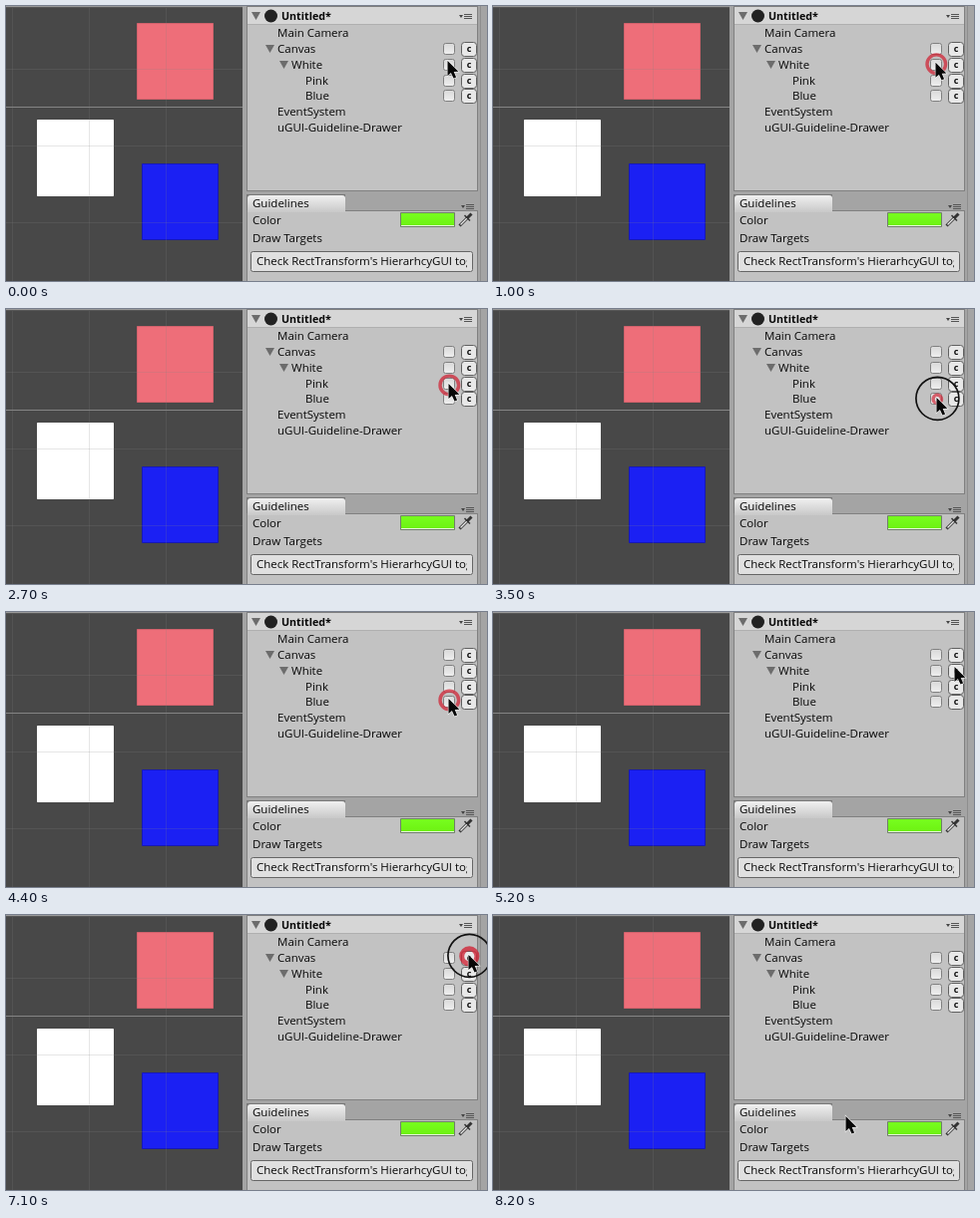
These frames come from a looping animation (482x276 px, 8.3 s). An HTML page with a canvas:

```html
<!DOCTYPE html>
<html lang="en">
<head>
<meta charset="utf-8">
<title>Guideline drawer</title>
<style>
html, body { margin: 0; width: 100%; height: 100%; overflow: hidden; background: #a4a4a4; }
canvas { display: block; width: 482px; height: 276px; }
</style>
</head>
<body>
<canvas id="stage"></canvas>
<script>
const LOOP = 8300, STEP = 100;
const FAMILY = '"Open Sans", "Noto Sans", sans-serif';
const FONT = '11.5px ' + FAMILY;
const BOLD = 'bold 10.7px ' + FAMILY;
const SMALL = 'bold 9px ' + FAMILY;

const canvas = document.getElementById('stage');
const ratio = window.devicePixelRatio || 1;
canvas.width = 482 * ratio;
canvas.height = 276 * ratio;
const c = canvas.getContext('2d');
c.scale(ratio, ratio);

const shapes = {
  White: { x: 31, y: 114, fill: '#fff', edge: '#fff' },
  Pink: { x: 131, y: 17, fill: '#ee6e79', edge: '#d2626c' },
  Blue: { x: 136, y: 158, fill: '#1b20f3', edge: '#1719b4' }
};
const SIDE = 77;

// label, indent, foldout, has buttons
const rows = [
  ['Main Camera', 272, false, false],
  ['Canvas', 272, true, true],
  ['White', 286, true, true],
  ['Pink', 300, false, true],
  ['Blue', 300, false, true],
  ['EventSystem', 272, false, false],
  ['uGUI-Guideline-Drawer', 272, false, false]
];

// start, end, shown targets
const selections = [
  [500, 1000, ['White']],
  [2000, 2700, ['Pink']],
  [3700, 4400, ['Blue']],
  [5500, 6400, ['Pink', 'Blue']],
  [7200, 7900, ['White', 'Pink', 'Blue']]
];
const presses = [300, 800, 1800, 2500, 3500, 4200, 5300, 6200, 7000, 7700];

// time, x, y of the pointer tip
const path = [
  [0, 443, 55], [100, 444, 56], [1200, 444, 57], [1600, 444, 75],
  [2900, 444, 75], [3300, 445, 89], [3600, 445, 89], [4200, 444, 87],
  [4500, 444, 87], [5100, 463, 55], [5700, 463, 55], [6000, 463, 52],
  [6600, 463, 53], [6900, 464, 40], [7900, 464, 40], [8200, 354, 202]
];

function rect(x, y, w, h, fill) {
  c.fillStyle = fill;
  c.fillRect(x, y, w, h);
}

function box(x, y, w, h, r, fill, stroke) {
  c.beginPath();
  c.roundRect(x + 0.5, y + 0.5, w - 1, h - 1, r);
  c.fillStyle = fill;
  c.fill();
  c.strokeStyle = stroke;
  c.lineWidth = 1;
  c.stroke();
}

function fade(y0, y1, from, to) {
  const g = c.createLinearGradient(0, y0, 0, y1);
  g.addColorStop(0, from);
  g.addColorStop(1, to);
  return g;
}

function poly(points, fill) {
  c.beginPath();
  points.forEach(([x, y]) => c.lineTo(x, y));
  c.closePath();
  c.fillStyle = fill;
  c.fill();
}

function line(points, color, width) {
  c.beginPath();
  points.forEach(([x, y]) => c.lineTo(x, y));
  c.strokeStyle = color;
  c.lineWidth = width;
  c.stroke();
}

function ring(x, y, r, width, color) {
  c.beginPath();
  c.arc(x, y, r, 0, 7);
  c.lineWidth = width;
  c.strokeStyle = color;
  c.stroke();
}

function text(s, x, y, font = FONT) {
  c.font = font;
  c.fillStyle = '#080808';
  c.fillText(s, x, y);
}

function foldout(x, y) {
  poly([[x, y], [x + 9, y], [x + 4.5, y + 8]], '#6c6c6c');
}

function menuIcon(x, y) {
  poly([[x, y + 1], [x + 4, y + 1], [x + 2, y + 4]], '#444');
  for (let i = 0; i < 3; i++) rect(x + 5, y + i * 2, 8, 1, '#555');
}

function drawScene(targets) {
  rect(0, 0, 237, 276, '#484848');
  rect(0, 0, 237, 1, '#999');
  rect(0, 1, 237, 1, '#555');
  rect(0, 101, 237, 1, '#858585');
  for (const { x, y, fill, edge } of Object.values(shapes))
    box(x, y, SIDE, SIDE, 0, fill, edge);
  for (let i = 0; i < 3; i++) {
    rect(6 + i * SIDE, 2, 1, 274, 'rgba(128,128,128,.2)');
    rect(0, 63 + i * SIDE, 237, 1, 'rgba(128,128,128,.2)');
  }
  for (const name of targets) {
    const { x, y } = shapes[name];
    for (const d of [0, SIDE]) {
      rect(x + d, 2, 1, 274, 'rgba(110,235,75,.75)');
      rect(0, y + d, 237, 1, 'rgba(110,235,75,.75)');
    }
  }
}

function drawHierarchy(targets) {
  rect(237, 0, 245, 276, '#a4a4a4');
  rect(241, 0, 232, 186, '#808080');
  rect(242, 1, 230, 184, '#c2c2c2');
  rect(242, 1, 230, 17, '#d6d6d6');
  rect(242, 18, 230, 1, '#b0b0b0');
  rect(475, 0, 1, 276, '#8e8e8e');
  foldout(246, 6);
  c.beginPath();
  c.arc(265.5, 10, 6.5, 0, 7);
  c.fillStyle = '#222';
  c.fill();
  text('Untitled*', 276, 14, BOLD);
  menuIcon(454, 8);

  rows.forEach(([label, x, open, buttons], i) => {
    const mid = 26.8 + i * 15.9;
    text(label, x, mid + 4);
    if (open) foldout(x - 12, Math.round(mid) - 4);
    if (!buttons) return;
    const top = Math.round(mid) - 6;
    box(438, top, 12, 12, 2, fade(top, top + 12, '#d8d8d8', '#f0f0f0'), '#808080');
    if (targets.includes(label))
      line([[440.5, top + 5.5], [443.5, top + 9], [449, top + 1]], '#1c2c62', 2.2);
    box(456, top - 1, 16, 15, 3, '#e8e8e8', '#606060');
    text('c', 461.7, top + 9, SMALL);
  });
}

function drawGuidelines(targets) {
  rect(241, 189, 99, 17, '#777');
  rect(241, 205, 232, 71, '#808080');
  rect(242, 206, 230, 70, '#c2c2c2');
  c.beginPath();
  c.roundRect(242, 190, 98, 17, [3, 3, 0, 0]);
  c.fillStyle = fade(190, 207, '#f0f0f0', '#c8c8c8');
  c.fill();
  text('Guidelines', 247, 202);
  menuIcon(456, 199);

  text('Color', 247, 219);
  box(395, 207, 55, 15, 0, fade(207, 222, '#78ff20', '#6cf010'), '#6f7f68');
  rect(396, 220, 53, 1, '#e4f5da');
  line([[454.5, 220.5], [462, 213]], '#333', 3);
  line([[455.5, 219.5], [462, 213]], '#eee', 1.2);
  line([[459.5, 210], [465, 215.5]], '#333', 1.5);
  line([[462, 213], [466.5, 208.5]], '#333', 3);

  text('Draw Targets', 247, 237);
  const count = Math.max(1, targets.length);
  box(245, 246, 223, 4 + count * 17, 2, '#e0e0e0', '#666');
  c.save();
  c.beginPath();
  c.rect(246, 246, 216, 30);
  c.clip();
  const lines = targets.length ? targets : ["Check RectTransform's HierarhcyGUI toggle"];
  lines.forEach((s, i) => text(s, 251, 260 + i * 17));
  c.restore();
}

function pointerAt(t) {
  let i = 0;
  while (i < path.length - 2 && path[i + 1][0] <= t) i++;
  const [t0, x0, y0] = path[i], [t1, x1, y1] = path[i + 1];
  const k = Math.min(1, (t - t0) / (t1 - t0));
  return [x0 + (x1 - x0) * k, y0 + (y1 - y0) * k];
}

function drawPointer(t) {
  const [x, y] = pointerAt(t);
  const press = presses.find(p => t >= p && t < p + 400);
  if (press !== undefined) {
    const age = (t - press) / 100;
    const radius = [4.2, 7.6, 9.3, 11][age];
    const width = [3.4, 5, 3.4, 2][age];
    const alpha = [0.7, 0.8, 0.75, 0.4][age];
    ring(x + 0.3, y + 1.4, radius, width, `rgba(207,38,55,${alpha})`);
    if (age < 2) ring(x + 0.4, y + 0.8, 21.5, 1.7, '#111');
  }
  c.save();
  c.translate(x - 0.5, y);
  c.beginPath();
  [[0, 0], [0, 15], [3.4, 12], [6, 17.5], [8.6, 16.4], [6.2, 11], [10.8, 10.8]]
    .forEach(([px, py]) => c.lineTo(px, py));
  c.closePath();
  c.lineWidth = 1.4;
  c.strokeStyle = 'rgba(255,255,255,.7)';
  c.stroke();
  c.fillStyle = '#080808';
  c.fill();
  c.restore();
}

function frame(now) {
  const t = Math.floor((now % LOOP) / STEP) * STEP;
  const active = selections.find(([from, to]) => t >= from && t < to);
  const targets = active ? active[2] : [];
  drawScene(targets);
  drawHierarchy(targets);
  drawGuidelines(targets);
  drawPointer(t);
}

const start = performance.now();
function tick(now) {
  frame(Math.max(0, now - start));
  requestAnimationFrame(tick);
}
requestAnimationFrame(tick);
</script>
</body>
</html>
```
